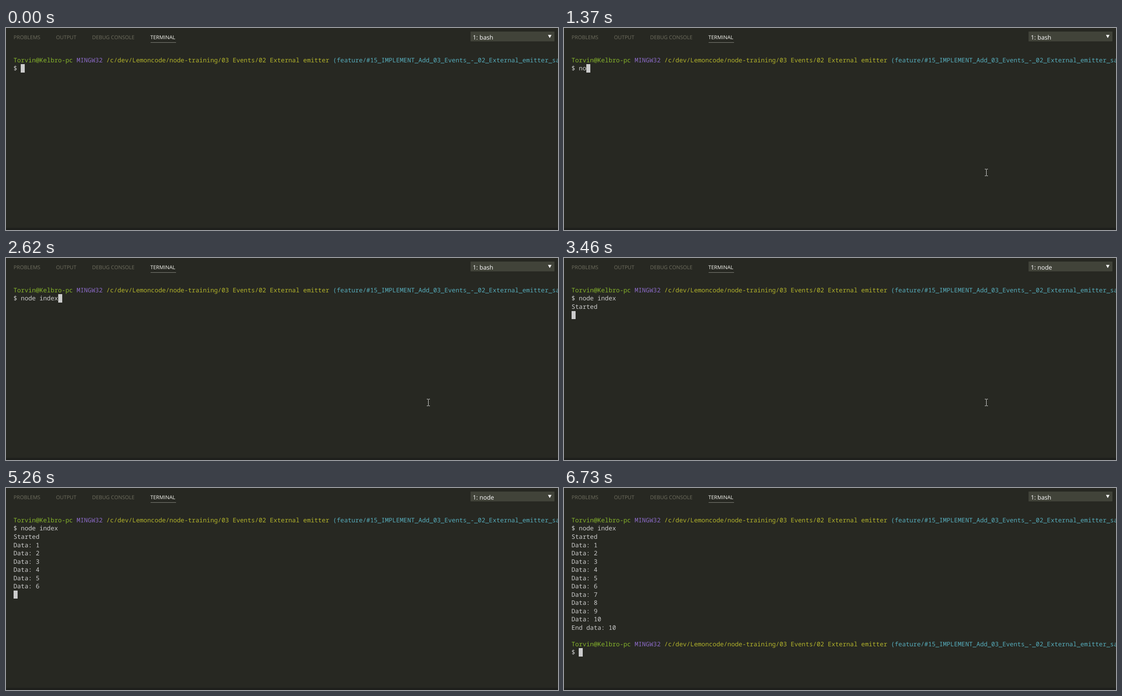
Write an HTML page that moves like this. It is 1237 px wide and 453 px high and loops after 7.29 s.

```html
<!DOCTYPE html>
<html lang="en">
<head>
<meta charset="utf-8">
<title>Terminal session</title>
<style>
  html, body { margin: 0; width: 100%; height: 100%; overflow: hidden; background: #272822; }
  svg { display: block; }
  text { white-space: pre; text-rendering: geometricPrecision; }
  .tabs { font: 11.6px "Open Sans", sans-serif; fill: #706f60; }
  .tabs .active { fill: #f8f8f2; }
  #label { font: 13.7px "Open Sans", sans-serif; fill: #fff; }
  #rows { font: 13.883px "Noto Sans Mono", monospace; fill: #ccc; }
  .user { fill: #86b42b; }
  .system { fill: #8c6bc8; }
  .path { fill: #b3b42b; }
  .branch { fill: #56adbc; }
</style>
</head>
<body>
<svg width="1237" height="453" viewBox="0 0 1237 453">
  <rect width="1237" height="453" fill="#272822"/>
  <rect y="448" width="1237" height="5" fill="#1e1f1c"/>
  <g class="tabs">
    <text x="17" y="25">PROBLEMS</text>
    <text x="112" y="25">OUTPUT</text>
    <text x="193" y="25">DEBUG CONSOLE</text>
    <text x="323.5" y="25" class="active">TERMINAL</text>
    <rect x="324" y="32" width="57" height="1" fill="#85857d"/>
  </g>
  <rect x="1041" y="8" width="188" height="22" fill="#414339"/>
  <svg x="1041" y="8" width="170" height="21">
    <text id="label" x="5" y="17.5"></text>
  </svg>
  <path d="M1214.5 15.5h8l-4 7z" fill="#fff"/>
  <g id="rows"></g>
  <rect id="caret" width="9" fill="#ccc"/>
  <path id="pointer" d="M-3 -7.5h3M1 -7.5h3M.5 -7v14M-3 7.5h3M1 7.5h3" stroke="#e0e0e0" fill="none"/>
</svg>
<script>
const LOOP = 7290, LEFT = 16.7, CELL = 8.33;
const COMMAND = "node index";
const KEY_TIMES = [1290, 1370, 1520, 1690, 1830, 1980, 2150, 2150, 2380, 2620];
const DATA_TIMES = [3780, 4090, 4390, 4620, 4940, 5260, 5580, 5870, 6190, 6420];
const ENTER = 3230, STARTED = 3460, FINISHED = 6420, PROMPT_BACK = 6570;
const LABELS = [[0, "bash"], [3310, "node"], [6500, "git"], [6730, "bash"]];
const PROMPT =
  '<tspan class="user">Torvin@Kelbro-pc</tspan> ' +
  '<tspan class="system">MINGW32</tspan> ' +
  '<tspan class="path">/c/dev/Lemoncode/node-training/03 Events/02 External emitter</tspan> ' +
  '<tspan class="branch">(feature/#15_IMPLEMENT_Add_03_Events_-_02_External_emitter_sample)</tspan>';

const byId = id => document.getElementById(id);
const rows = byId("rows"), caret = byId("caret"), label = byId("label"), pointer = byId("pointer");
const rowTop = row => Math.round(62.92 + 18.53 * row);
const passed = (times, t) => times.filter(time => time <= t).length;

function terminalAt(t) {
  const lines = [PROMPT, "$ " + COMMAND.slice(0, passed(KEY_TIMES, t))];
  let column = lines[1].length;
  if (t >= ENTER) column = 0;
  if (t >= STARTED) lines.push("Started");
  for (let i = 1; i <= passed(DATA_TIMES, t); i++) lines.push("Data: " + i);
  if (t >= FINISHED) lines.push("End data: 10");
  if (t >= PROMPT_BACK) {
    lines.push("", PROMPT, "$ ");
    column = 2;
  }
  const caretRow = column ? lines.length - 1 : lines.length;
  return { lines, column, caretRow };
}

// The pointer glides in from below, rests, then leaves to the lower right.
function pointerAt(t) {
  if (t < 140 || t >= 4240) return null;
  const away = Math.max(0, 1 - (t - 70) / 440) ** 2;
  const leave = Math.max(0, (t - 3940) / 220) ** 1.5;
  return [946 + 110 * away + 119 * leave, 324.5 + 160 * away + 108 * leave].map(Math.floor);
}

let shown = "";
function draw() {
  const t = performance.now() % LOOP;
  const { lines, column, caretRow } = terminalAt(t);
  const markup = lines.map((line, row) =>
    `<text x="${LEFT}" y="${rowTop(row) + 14}">${line}</text>`).join("");
  if (markup !== shown) rows.innerHTML = shown = markup;

  const top = rowTop(caretRow);
  caret.setAttribute("x", Math.round(LEFT + column * CELL));
  caret.setAttribute("y", top);
  caret.setAttribute("height", rowTop(caretRow + 1) - top);

  label.textContent = "1: " + LABELS.filter(([time]) => time <= t).pop()[1];

  const spot = pointerAt(t);
  pointer.style.display = spot ? "" : "none";
  if (spot) pointer.setAttribute("transform", `translate(${spot})`);
  requestAnimationFrame(draw);
}
draw();
</script>
</body>
</html>
```
